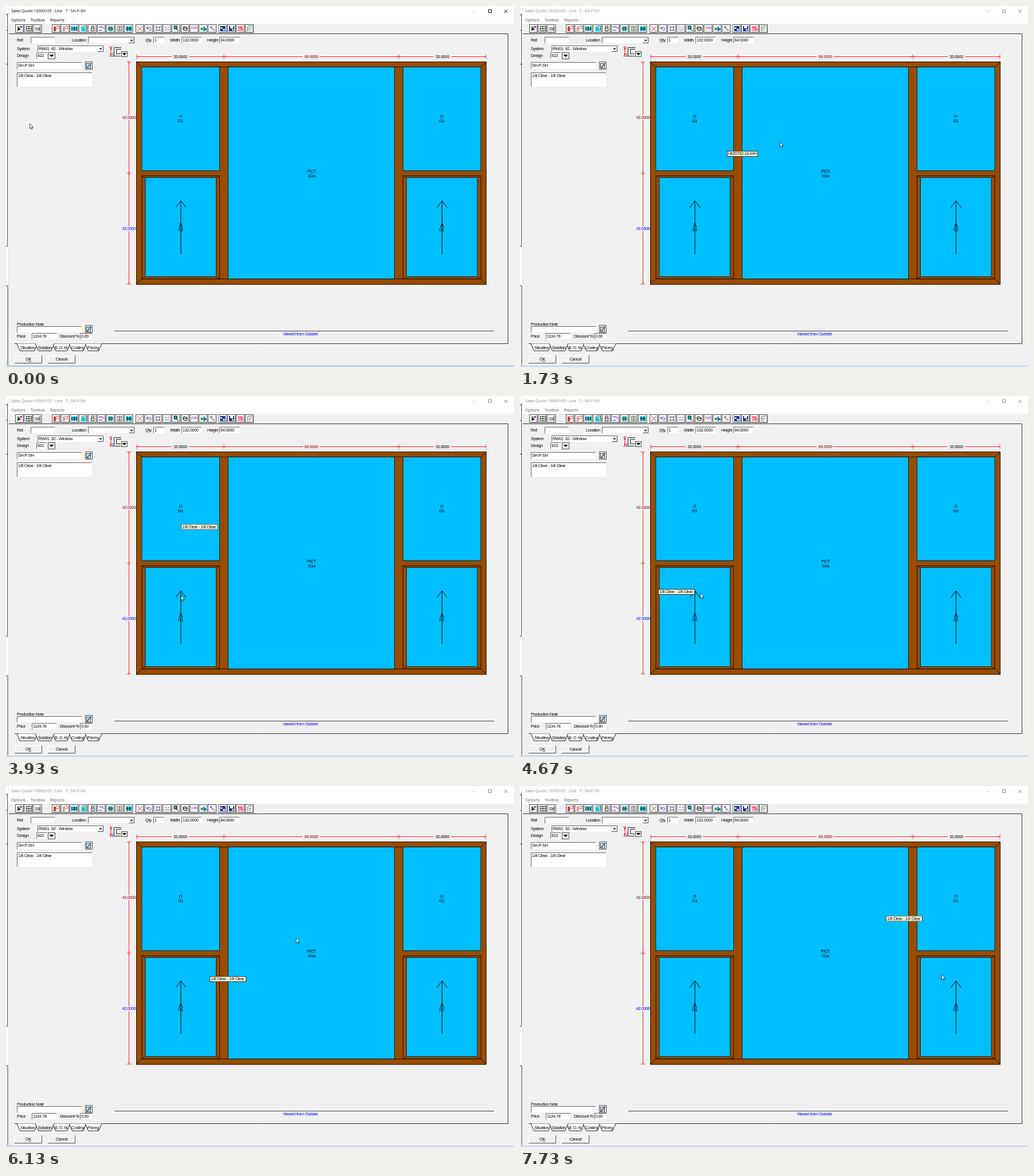
An HTML page with a canvas that plays this animation: 886x632 px, repeating every 8000 ms.

```html
<!DOCTYPE html>
<html lang="en">
<head>
<meta charset="utf-8">
<title>Sales Quote</title>
<style>
html, body { margin: 0; width: 100%; height: 100%; overflow: hidden; background: #f0f0f0; }
canvas { display: block; }
</style>
</head>
<body>
<canvas id="stage" width="886" height="632"></canvas>
<script>
const ctx = document.getElementById('stage').getContext('2d');
const FACE = '#f0f0f0', GLASS = '#00bfff', WOOD = '#994c00', RED = '#ff2020';
const UI_FONT = '7.3px "Liberation Sans", sans-serif';
const TITLE_FONT = '6.8px "Open Sans", sans-serif';

function fill(x, y, w, h, color) {
  ctx.fillStyle = color;
  ctx.fillRect(x, y, w, h);
}
function stroke(d, color = '#000', width = 1) {
  ctx.strokeStyle = color;
  ctx.lineWidth = width;
  ctx.stroke(new Path2D(d));
}
function shape(d, color) {
  ctx.fillStyle = color;
  ctx.fill(new Path2D(d));
}
function box(x, y, w, h, color, edge = '#000', width = 1) {
  fill(x, y, w, h, color);
  ctx.strokeStyle = edge;
  ctx.lineWidth = width;
  ctx.strokeRect(x + .5, y + .5, w - 1, h - 1);
}
function text(s, x, y, color = '#000', align = 'left', font = UI_FONT) {
  ctx.font = font;
  ctx.letterSpacing = font === UI_FONT ? '-0.35px' : '0px';
  ctx.textAlign = align;
  ctx.textBaseline = 'middle';
  ctx.fillStyle = color;
  ctx.fillText(s, x, y);
}
function field(x, y, w, h, value = '', textY = y + h / 2) {
  fill(x, y, w, h, '#fff');
  stroke(`M${x + .5} ${y + h}V${y + .5}H${x + w}`, '#696969');
  text(value, x + 2, textY);
}
function button(x, y, w, h) {
  fill(x, y, w, h, FACE);
  stroke(`M${x + .5} ${y + h}V${y + .5}H${x + w}`, '#fff');
  stroke(`M${x} ${y + h - .5}H${x + w - .5}V${y}`, '#505050');
}
function dropArrow(x, y, size) {
  shape(`M${x - size} ${y - size / 2}h${2 * size}l${-size} ${size}z`, '#000');
}
function dropButton(x, y, w, h) {
  button(x, y, w, h);
  stroke(`M${x} ${y + .5}h${w}M${x + .5} ${y}v${h}`, '#505050');
  dropArrow(x + w / 2, y + h / 2, 4);
}
function editButton(x, y) {
  box(x, y, 13, 14, FACE, '#555');
  box(x + 2, y + 3, 8, 9, '#fff', '#333');
  stroke(`M${x + 4.5} ${y + 9.5}l6-7`, '#2a7fc0', 2.6);
  stroke(`M${x + 3} ${y + 11}l2-2`, '#000');
}

// Toolbar groups: start x, pitch, icons. Each icon part is "color path"; "!" means stroked.
const toolbar = [
  [16, 15.8, [
    '#000 M3 11l3-5 4 3z;#c3c M8 3h4v3H8z;#080 M4 4h3v3H4z',
    '!#333 M3.5 3.5h9v8h-9zM8 3v9M3 7.5h9',
    '!#333 M3 6.5h7v3H3M11.5 3v9']],
  [80, 15.8, [
    '#d33 M3 4h4v8H3z;!#e55 M7 3.5h5v4H7',
    '#d99 M3 4h4v8H3z;!#c66 M7 3.5h5v4H7',
    '#0bc M3 4h9v7H3z;!#000 M3 4v7M7.5 4v7M12 4v7',
    '#0cd M4 5h7v7H4z;!#077 M4 5l2-2h7v7l-2 2',
    '!#222 M6 6V3h4v3M5.5 6.5h5v5h-5z',
    '!#33c M3 4.5h6M3 10.5h5;!#c3c M10 4v3h3',
    '#5aa M3 4h9v7H3z;!#066 M6 3v9M9 3v9M3 7.5h9',
    '!#666 M3.5 3.5h8v8h-8zM7.5 3v9M5 6h5M5 9h5',
    '#0bb M3 4h10v7H3z;!#036 M5 3v9M10 3v9M3 7.5h9']],
  [226, 15.8, [
    '!#d44 M3 3l9 9M12 3l-9 9',
    '!#44a M4 4v4h4M4 8q3-5 6-2t-2 5',
    '!#558 M3 4.5h9M5 4v6M10 4v6M3 10.5h9',
    '!#88b M3 5.5h4M9 5.5h3M3 9.5h9',
    '#0bd M4 3h5v5H4z;!#000 M4 3h5v5H4zM8 8l4 4',
    '!#000 M4 9V5l3-1 4 2v4l-3 1zM4 7h7',
    '',
    '#0a4 M3 6h4v4H3z;#06a M8 4h2v8H8zM9 7h4v3H9z',
    '!#116 M4 4l3 3 4 4M4 6l3-3']],
  [370.5, 15.5, [
    '#13a M3 3h9v9H3z;#fe4 M4 5h3v3H4z;#fff M8 8h3v3H8z',
    '#13a M3 3h9v9H3z;#fff M5 3h5v4H5z;#fe4 M8 8h3v3H8z',
    '#f9a M3 3h9v9H3z;!#d33 M3 5h6v4h4',
    '!#575 M4 12V5l3-2h5M6 7h5M6 10h3']]
];

function drawToolbar() {
  for (const [start, pitch, icons] of toolbar) {
    icons.forEach((icon, i) => {
      ctx.save();
      ctx.translate(start + i * pitch, 32);
      box(0, 0, 15, 15, FACE, '#555');
      stroke('M1.5 13V1.5H13', '#fff');
      stroke('M2 13.5H13.5V2', '#aaa');
      for (const part of icon.split(';').filter(Boolean)) {
        const [color, d] = part.split(/ (.*)/);
        if (color[0] === '!') stroke(d, color.slice(1));
        else shape(d, color);
      }
      if (!icon) text('CAD', 7.5, 7, '#809', 'center', '5px "Liberation Sans", sans-serif');
      ctx.restore();
    });
  }
}

function drawChrome(active) {
  fill(0, 0, 886, 632, FACE);
  fill(0, 0, 4, 488, '#fff');
  stroke('M2.5 13V419.5H0M0 15.5h3M0 42.5h3M0 101.5h4M0 488.5h3V627', '#444');
  fill(4, 0, 882, 31, '#fff');
  stroke('M4.5 0V628', active ? '#ddd' : '#e8e8e8');
  stroke('M0 628.5H886', active ? '#8e9fb8' : '#b4bfce');
  fill(0, 629, 886, 3, '#e4ebf5');

  const ink = active ? '#000' : '#888';
  text('Sales Quote 10000105 : Line   7 : SH-P-SH', 9, 9.5, ink, 'left', TITLE_FONT);
  const menuInk = active ? '#000' : '#555';
  text('Options', 9, 25, menuInk, 'left', TITLE_FONT);
  text('Toolbox', 43, 25, menuInk, 'left', TITLE_FONT);
  text('Reports', 77, 25, menuInk, 'left', TITLE_FONT);
  stroke('M814 9.5h5', '#ccc');
  stroke('M841.5 6.5h5v5h-5zM869 6.5l5.5 5.5M874.5 6.5l-5.5 5.5', ink);
  drawToolbar();
  stroke('M5 48.5H875.5V589.5H15', '#333');
}

function drawForm() {
  text('Ref.', 19, 59.5);
  field(43, 54, 42, 11);
  text('Location', 115, 59.5);
  field(143, 54, 81, 11);
  button(214, 55, 10, 10);
  dropArrow(219, 60.5, 2.5);
  text('Qty.', 243, 59.5);
  field(257, 54, 19, 11, '1');
  text('Width', 286, 59.5);
  field(306, 54, 35, 11, '132.0000');
  text('Height', 351, 59.5);
  field(372, 54, 35, 11, '84.0000');
  text('System', 19, 74.5);
  field(55, 69, 115, 11, 'RW01  82 - Window');
  button(160, 70, 10, 10);
  dropArrow(165, 75, 2.5);
  text('Design', 19, 86.5);
  field(53, 81, 18, 11, '822');
  dropButton(73, 81, 13, 12);

  stroke('M183 72V87M180 71.5h6M180 87.5h6', RED);
  shape('M183 72l2 4h-4zM183 87l2-4h-4z', RED);
  stroke('M201 72.5H188.5V87.5H200M201 75.5H192.5V83.5H200', '#222');
  stroke('M186.5 82v7', '#44f');
  dropButton(201, 79, 11, 10);

  field(19, 98, 113, 12, 'SH-P-SH');
  editButton(138, 97);
  field(19, 116, 131, 25, '1/8 Clear - 1/8 Clear', 122);

  text('Production Note', 19, 556);
  field(19, 559, 113, 11);
  editButton(138, 557);
  text('Price', 19, 577);
  field(45, 571, 43, 11, '1134.78');
  text('Discount %', 94, 577);
  field(129, 571, 21, 11, '0.00');

  stroke('M189 567.5H851', '#444');
  text('Viewed from Outside', 513.5, 573, '#00f', 'center');
}

function drawTab(x, right, label, textX, active) {
  const d = `M${x} 589.5l5.5 12.5H${right - 5.5}L${right} 589.5`;
  shape(d, active ? FACE : '#fff');
  stroke(d, '#222');
  if (active) stroke(`M${x + 1} 589.5H${right - 1}`, FACE);
  text(label, textX, 597);
}
function drawFooter() {
  drawTab(19, 55, 'Situation', 25);
  drawTab(81, 112, 'B. O. M.', 85);
  drawTab(110, 140, 'Costing', 114);
  drawTab(138, 167, 'Pricing', 142);
  drawTab(51, 84, 'Solution', 56, true);
  button(15, 610, 48, 14);
  text('OK', 39, 617, '#000', 'center');
  stroke('M39.5 620.5h4', '#000', .7);
  button(73, 610, 48, 14);
  text('Cancel', 97, 617, '#000', 'center');
}

function drawDimension(horizontal, at, stops, labels) {
  const pt = (a, b) => horizontal ? `${a} ${b} ` : `${b} ${a} `;
  stroke(`M${pt(stops[0], at)}L${pt(stops[stops.length - 1], at)}`, RED);
  stops.forEach((s, i) => {
    stroke(`M${pt(s, at - 4)}L${pt(s, at + 4)}`, RED, .8);
    for (const dir of [-1, 1]) {
      if (!stops[i + dir]) continue;
      const a = s + dir * 3;
      shape(`M${pt(s, at)}L${pt(a, at - 1.2)}L${pt(a, at + 1.2)}z`, RED);
    }
  });
  labels.forEach(([value, color], i) => {
    const mid = (stops[i] + stops[i + 1]) / 2;
    const [x, y] = horizontal ? [mid, at] : [at, mid];
    fill(x - 15, y - 4.5, horizontal ? 30 : 27, 9, FACE);
    text(value, x, y + .5, color, 'center');
  });
}

const LINE = .8;
function pane(x, y, w, h, color) {
  box(x, y, w, h, color, '#000', LINE);
}
function drawSideLite(x) {
  pane(x, 106, 136.5, 182, GLASS);
  pane(x, 296, 136.5, 181, WOOD);
  stroke(`M${x} 296l6 4M${x + 136.5} 296l-6 4M${x} 477l6-4M${x + 136.5} 477l-6-4`, '#000', LINE);
  pane(x + 6, 299, 124.5, 174, GLASS);
  const c = x + 68.5;
  text('O', c - .5, 193, '#000', 'center');
  text('G1', c - .5, 201, '#000', 'center');
  stroke(`M${c} 433V340M${c - 9} 352l9-12 9 12M${c - 3} 387l3-8 3 8`);
  text('G1', c - .5, 391, '#000', 'center');
}
function drawWindow() {
  pane(227, 97, 611, 389.5, WOOD);
  stroke('M227 97l10 10M838 97l-10 10M227 486l10-10M838 486l-10-10', '#000', LINE);
  drawSideLite(236.5);
  drawSideLite(692);
  pane(387, 106, 291, 371, GLASS);
  stroke('M237 106.5H828M237 476.5H828', '#000', LINE);
  text('PICT.', 533, 288.5, '#000', 'center');
  text('G1a', 533, 296.5, '#000', 'center');
  drawDimension(true, 88.5, [228, 380, 685, 837],
    [['33.0000', '#000'], ['66.0000', '#900000'], ['33.0000', '#000']]);
  drawDimension(false, 214.5, [97.5, 292, 485.5],
    [['42.0000', '#900000'], ['42.0000', '#00f']]);
}

const GLASS_TIP = '1/8 Clear - 1/8 Clear', FRAME_TIP = 'HMST82-10-WH';
// Shown from, until, x, y, label, visible width
const tips = [
  [1000, 1460, 180, 247.5, FRAME_TIP, 54],
  [1530, 2400, 361, 253, FRAME_TIP, 54],
  [2465, 4000, 305.5, 223.5, GLASS_TIP, 64],
  [4130, 4800, 241, 337, GLASS_TIP, 64],
  [5000, 5195, 315, 340, GLASS_TIP, 53],
  [5260, 6730, 355, 332, GLASS_TIP, 64],
  [6865, 8000, 638, 226.5, GLASS_TIP, 64]
];
// White popup background visible briefly before its label
const flashes = [[4000, 4065, 195, 340], [6730, 6795, 560, 231]];

function drawTips(t) {
  for (const [from, until, x, y] of flashes)
    if (t >= from && t < until) fill(x, y, 116.5, 17.5, '#fff');
  for (const [from, until, x, y, label, w] of tips) {
    if (t < from || t >= until) continue;
    ctx.save();
    ctx.beginPath();
    ctx.rect(x, y, w, 10);
    ctx.clip();
    box(x, y, label === GLASS_TIP ? 64 : 54, 10, '#ffffe1', '#333');
    text(label, x + 2, y + 5.2);
    ctx.restore();
  }
}

// Pointer moves: start, end, destination
const home = [41, 205];
const moves = [
  [333, 1200, 311, 235], [1200, 1800, 458, 237], [1933, 2200, 334, 189],
  [3200, 3930, 305, 348], [4600, 5100, 490, 270], [6067, 6530, 771, 178],
  [7200, 7730, 735, 329]
];
function pointerAt(t) {
  let [x, y] = home;
  for (const [start, end, toX, toY] of moves) {
    const p = Math.min(1, Math.max(0, (t - start) / (end - start)));
    const e = p * p * (3 - 2 * p);
    x += (toX - x) * e;
    y += (toY - y) * e;
  }
  return [x, y];
}
function drawPointer(t) {
  ctx.save();
  ctx.translate(...pointerAt(t));
  const d = 'M.5 .5V9l2-1.8 1.4 3 1.3-.6-1.4-2.9h2.7z';
  shape(d, '#fff');
  stroke(d, '#222', .8);
  ctx.restore();
}

const STEP = 200 / 3;
function draw(now) {
  const t = Math.floor((now % 8000 + 5) / STEP) * STEP;
  drawChrome(t < 60);
  drawForm();
  drawFooter();
  drawWindow();
  drawTips(t + 4);
  drawPointer(t);
  requestAnimationFrame(draw);
}
requestAnimationFrame(draw);
</script>
</body>
</html>
```
